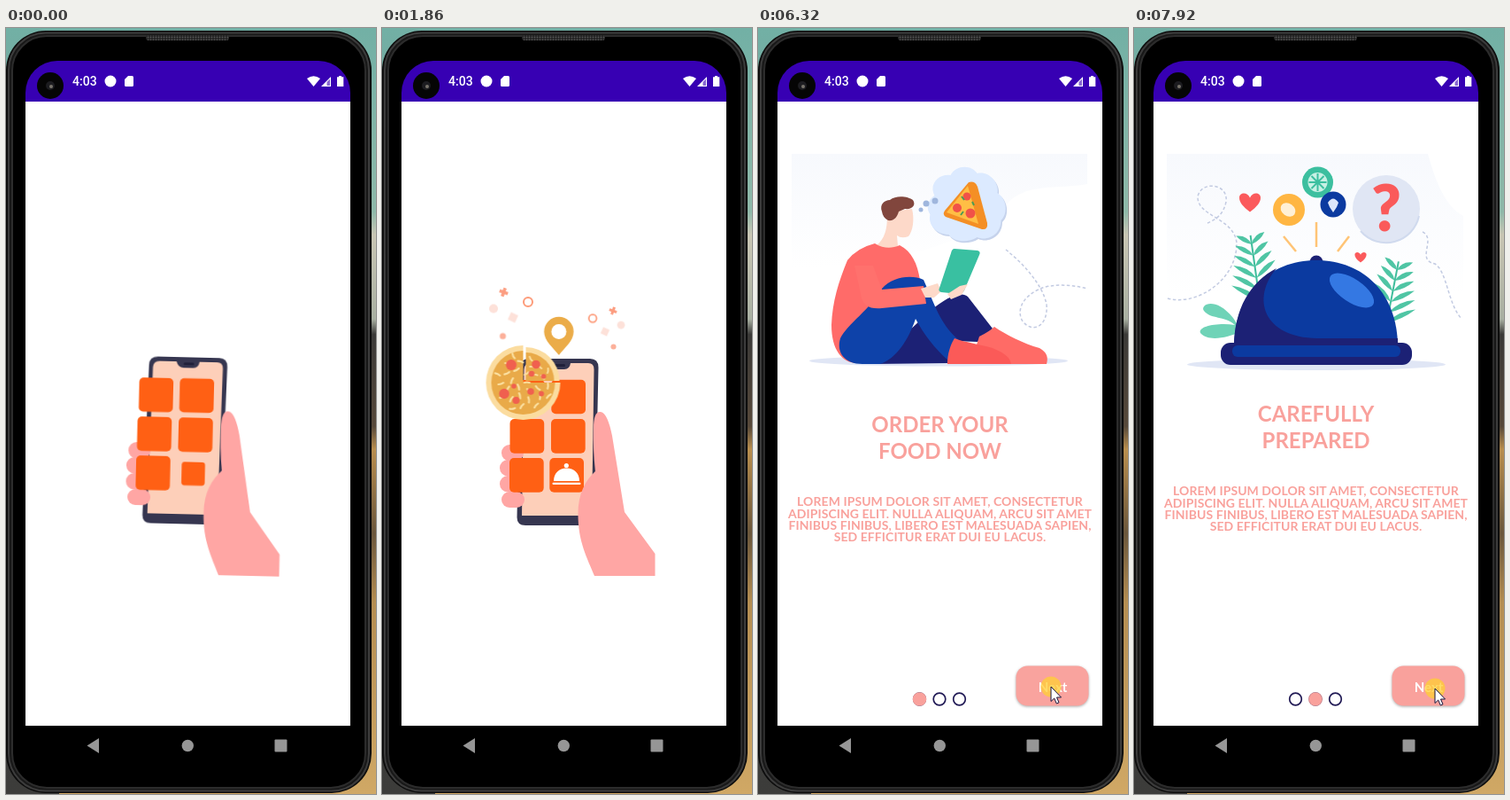
These frames come from a looping animation (418x864 px, 7990 ms). An HTML page:

```html
<!DOCTYPE html>
<html lang="en">
<head>
<meta charset="utf-8">
<title>Food ordering app</title>
<style>
html, body { margin: 0; width: 100%; height: 100%; overflow: hidden; background: #78b3a8; }
svg { position: absolute; display: block; }
.full { left: 0; top: 0; width: 418px; height: 864px; }
#screen { position: absolute; left: 22px; top: 83px; width: 367px; height: 703.5px; overflow: hidden; background: #fff; }
#screen .full { left: -22px; top: -83px; }
#intro { position: absolute; inset: 0; background: #fff; }
.page { position: absolute; left: 0; top: 37px; width: 367px; height: 600px; transform-origin: 0 0; }
.title, .para, .next { font-family: Lato, "Open Sans", sans-serif; font-weight: 700; text-anchor: middle; fill: #f9a19c; }
.title { font-size: 24px; }
.para { font-size: 14px; letter-spacing: .07px; }
.next { font-size: 15px; fill: #fff; }
.clock { font: 500 14px Roboto, sans-serif; fill: #fff; }
.ask { font: 900 72px Lato, sans-serif; text-anchor: middle; fill: #fa5a5a; }
.dash { fill: none; stroke: #c3cbe2; stroke-width: 1.5; stroke-dasharray: 3.5 2.5; }

.hand, .tile, .dish, .pizza, .pin, .bit, #intro, .page, .cursor, .cursor g, .click, .glow, .active {
  animation: 7990ms linear infinite;
}
.hand { transform-origin: 272px 620px; animation-name: settle; }
.tile { transform-origin: 209px 504px; animation-name: tile; }
.dish { transform-origin: 208.5px 504px; animation-name: dish; }
.pizza { animation-name: pizza; }
.pin { animation-name: pin; }
.bit { animation-name: burst; }
#intro { animation-name: enter; }
#first { animation-name: leave; }
#second { animation-name: arrive; }
.cursor { animation-name: show; animation-timing-function: step-end; }
.cursor g { animation-name: travel; }
.click { animation-name: click; animation-timing-function: step-end; }
.glow { animation-name: glow; }
.active { animation-name: active; animation-timing-function: step-end; }

@keyframes settle {
  0% { transform: rotate(1.35deg); animation-timing-function: ease-out; }
  6%, 100% { transform: none; }
}
@keyframes tile {
  0% { transform: scale(.68); animation-timing-function: ease-out; }
  3% { transform: scale(.96); }
  7.3% { transform: scale(.95); }
  10.8%, 100% { transform: scale(1); }
}
@keyframes dish {
  0%, 2.5% { transform: scale(0); animation-timing-function: ease-out; }
  7.3% { transform: scale(.92); }
  10.8%, 100% { transform: scale(1); }
}
@keyframes pizza {
  0%, 4.4% { transform: scale(0); }
  7.26% { transform: scale(.86); animation-timing-function: ease-out; }
  8.9% { transform: scale(1.09); animation-timing-function: ease-in-out; }
  11.2%, 100% { transform: scale(1); }
}
@keyframes pin {
  0%, 5.4% { transform: scale(0); }
  7.26% { transform: scale(.56); animation-timing-function: ease-out; }
  9.3% { transform: scale(1.09); animation-timing-function: ease-in-out; }
  11.6%, 100% { transform: scale(1); }
}
@keyframes burst {
  0%, 12% { transform: translate(var(--dx), var(--dy)) scale(0); opacity: 0; animation-timing-function: ease-out; }
  20.8% { transform: translate(0, 5px) scale(1); opacity: 1; }
  23.3% { transform: translate(0, 0) scale(1); opacity: 1; }
  30.9% { transform: translate(0, -8px) scale(1); opacity: .75; }
  39.5%, 100% { transform: translate(0, -8px) scale(.8); opacity: 0; }
}
@keyframes enter {
  0%, 41.9% { opacity: 0; transform: translateY(20px); animation-timing-function: ease-out; }
  45.6%, 100% { opacity: 1; transform: none; }
}
@keyframes leave {
  0%, 90.9% { transform: perspective(1200px) rotateY(0deg); }
  91.6% { transform: perspective(1200px) rotateY(5.8deg); animation-timing-function: ease-in-out; }
  96.8%, 100% { transform: perspective(1200px) rotateY(90deg); }
}
@keyframes arrive {
  0%, 90.9% { transform: translateX(367px) perspective(1200px) rotateY(-90deg); }
  91.6% { transform: translateX(363.5px) perspective(1200px) rotateY(-89.2deg); animation-timing-function: ease-in-out; }
  96.8%, 100% { transform: translateX(0) perspective(1200px) rotateY(0deg); }
}
@keyframes show {
  0% { opacity: 0; }
  30% { opacity: 1; }
  39.9% { opacity: 0; }
  50% { opacity: 1; }
}
@keyframes travel {
  0%, 30% { transform: translate(346px, 783px); }
  31.7% { transform: translate(256px, 702px); }
  35% { transform: translate(148px, 588px); animation-timing-function: ease-out; }
  39.2% { transform: translate(82px, 572px); animation-timing-function: step-end; }
  50% { transform: translate(88px, 559px); animation-timing-function: ease-in-out; }
  58.2%, 85% { transform: translate(331px, 743px); animation-timing-function: ease-in-out; }
  90.1%, 92.5% { transform: translate(99px, 585px); animation-timing-function: ease-in-out; }
  98.4%, 100% { transform: translate(340px, 745px); }
}
@keyframes click {
  0% { opacity: 0; }
  79% { opacity: .75; }
  81.5% { opacity: 0; }
  98.7% { opacity: .75; }
}
@keyframes glow {
  0%, 79% { opacity: 0; }
  80% { opacity: .18; }
  81.6%, 100% { opacity: 0; }
}
@keyframes active {
  0% { transform: none; }
  95.4%, 100% { transform: translateX(22.5px); }
}
</style>
</head>
<body>

<svg class="full" viewBox="0 0 418 864">
  <defs>
    <linearGradient id="wall" x2="0" y2="1">
      <stop offset="0" stop-color="#72b0a5"/><stop offset=".24" stop-color="#8fb9a9"/>
      <stop offset=".27" stop-color="#c9c6b4"/><stop offset=".38" stop-color="#a9b0a2"/>
      <stop offset=".4" stop-color="#3b3a38"/><stop offset=".52" stop-color="#57493a"/>
      <stop offset=".55" stop-color="#b98e4e"/><stop offset=".66" stop-color="#6b573c"/>
      <stop offset=".75" stop-color="#b58e52"/><stop offset="1" stop-color="#d0a865"/>
    </linearGradient>
    <linearGradient id="shade" x2="0" y2="1">
      <stop offset="0" stop-color="#72b0a5"/><stop offset=".3" stop-color="#7d9a90"/>
      <stop offset=".45" stop-color="#454543"/><stop offset="1" stop-color="#3c3c3a"/>
    </linearGradient>
    <pattern id="mesh" width="3" height="3" patternUnits="userSpaceOnUse">
      <rect width="3" height="3" fill="#222"/><circle cx="1.5" cy="1.5" r=".9" fill="#555"/>
    </pattern>
  </defs>
  <rect width="418" height="864" fill="url(#wall)"/>
  <rect width="60" height="864" fill="url(#shade)"/>
  <rect x="0" y="3" width="413" height="860" rx="45" fill="#0d0d0d"/>
  <rect x="3" y="5.500" width="407" height="855" rx="42" fill="#181818" stroke="#3c3c3c" stroke-width="2"/>
  <rect x="7" y="9" width="399" height="848" rx="39" stroke="#2c2c2c" stroke-width="2"/>
  <rect x="158" y="8" width="94" height="6" rx="3" fill="url(#mesh)"/>
  <path d="M22 84V73A36 36 0 0 1 58 37H353A36 36 0 0 1 389 73V84Z" fill="#3700b3"/>
  <circle cx="50" cy="65" r="15" fill="#050505"/>
  <circle cx="50" cy="65" r="5" fill="#1c1c20"/><circle cx="51" cy="66" r="2" fill="#77736b"/>
  <text class="clock" x="75" y="65">4:03</text>
  <g fill="#fff">
    <circle cx="118" cy="60" r="6.5"/>
    <path d="M138 54H142.500Q144 54 144 55.500V64.500Q144 66 142.500 66H135.500Q134 66 134 64.500V58Z"/>
    <path d="M340 57Q347.500 51.500 355 57L347.500 66Z"/>
    <path d="M356 66L367 55V66Z"/>
    <path d="M376 54H379V55.300H381.300V66H374V55.300H376Z"/>
  </g>
  <path d="M362.500 61V65H366V57.500Z" fill="#3700b3" opacity=".6"/>
  <g fill="#969696">
    <path d="M91.500 809.500L105 801V818Z"/><circle cx="205.300" cy="809.500" r="6.700"/>
    <rect x="303.500" y="802.500" width="14" height="14" rx="1"/>
  </g>
</svg>

<div id="screen">
  <svg class="full" viewBox="0 0 418 864">
    <g class="hand">
      <path d="M166 373H235Q244.500 373 244.500 383L242 500L238 561H162Q152.500 561 152.500 552L156 383Q156 373 166 373Z" fill="#363650"/>
      <path d="M168 378H187Q189 385 195 385H206Q212 385 213 378H233Q239.500 378 239.500 385L237 550H158L160.500 385Q161 378 168 378Z" fill="#fdcfb9"/>
      <rect x="195" y="379" width="12" height="3" rx="1.500" fill="#20203a"/>
      <g fill="#ffa6a4">
        <rect x="135" y="470" width="25" height="18.500" rx="9"/>
        <rect x="133" y="487" width="26" height="18.500" rx="9"/>
        <rect x="133" y="505" width="26" height="18.500" rx="9"/>
        <rect x="135" y="523" width="26" height="18" rx="9"/>
      </g>
      <g fill="#ff6014">
        <rect x="145.500" y="397" width="38.500" height="38.500" rx="5"/>
        <rect x="191.300" y="396.800" width="38.700" height="38.500" rx="5"/>
        <rect x="144.500" y="441" width="38.700" height="38.700" rx="5"/>
        <rect x="191" y="441" width="38.700" height="38.700" rx="5"/>
        <rect x="144" y="485" width="38.700" height="38.700" rx="5"/>
        <rect class="tile" x="189.300" y="485" width="38.700" height="38.700" rx="5"/>
      </g>
      <g class="dish" fill="#fff">
        <circle cx="208.300" cy="493.500" r="2.600"/>
        <path d="M194 511C194 502 200 496.500 208.500 496.500S223 502 223 511Z"/>
        <rect x="192.500" y="512.700" width="32" height="2.200" rx="1"/>
      </g>
      <path d="M239 452C239 438 242 432 247 433C253 434 257 445 260 460L274 546L308.500 593V618H240C232 598 221.500 580 221.500 548C221.500 525 230 510 241 500C239 482 238.500 466 239 452Z" fill="#ffa6a4"/>
    </g>
    <g transform="translate(159.500 400)"><g class="pizza" id="pizza"></g></g>
    <g transform="translate(199.800 369)"><g class="pin">
      <path d="M0 0C-6-8-16.700-16-16.700-26.500A16.700 16.700 0 0 1 16.700-26.500C16.700-16 6-8 0 0Z" fill="#ebac48"/>
      <circle cy="-26.500" r="8.500" fill="#fff"/>
    </g></g>
    <g id="confetti"></g>
  </svg>

  <div id="intro">
    <div class="page" id="first">
      <svg width="367" height="600" viewBox="22 120 367 600">
        <defs><linearGradient id="haze" x2="0" y2="1">
          <stop offset="0" stop-color="#f7f9fd"/><stop offset="1" stop-color="#fff"/>
        </linearGradient></defs>
        <path d="M38 142H372V176C340 182 300 174 280 200C240 250 120 270 38 270Z" fill="url(#haze)"/>
        <ellipse cx="204" cy="375.500" rx="146" ry="6" fill="#e0e6f5"/>
        <path class="dash" d="M280 250C300 266 322 290 326 312C328 336 311 345 299 331C290 316 303 298 325 292C343 288 360 291 372 294"/>
        <path d="M130 379L196 318C212 304 230 296 237 303L265 339L248 354L222 353L214 378Z" fill="#1c2175"/>
        <path d="M250 348Q262 342 267 337C280 346 300 356 318 361C327 366 328 372 326 379H240Z" fill="#ff6b66"/>
        <path d="M152 207L174 204C177 216 175 229 170 235Q162 238 157 234L158 246Q145 256 134 245C143 238 146 227 146 212Z" fill="#fdd9c9"/>
        <path d="M140 207C137 199 143 194 149 194C156 188 170 190 175 194C179 200 174 205 166 204L159 207C157 214 153 218 147 217Q141 214 140 207Z" fill="#81463d"/>
        <path d="M132 243C142 249 151 249 160 245C174 252 180 266 183 284L150 330L112 378C95 378 83 363 83 335C84 309 91 286 101 262Q112 248 132 243Z" fill="#ff6b69"/>
        <path d="M140 294C152 280 174 278 187 284L200 314C208 332 217 344 226 351L215 375C200 362 187 345 178 328C170 352 156 373 138 379H118C98 379 88 366 93 350C100 335 128 316 140 294Z" fill="#0e42a9"/>
        <path d="M222 350C235 355 248 356 265 361C277 366 285 371 286 379H214C214 368 217 358 222 350Z" fill="#fb5a58"/>
        <path d="M109 268L116 300C118 314 126 317 140 316L190 311L187 291L140 295L130 268Z" fill="#ff716d"/>
        <path d="M184 294L203 288L207 297L199 304L189 304Z" fill="#fdd9c9"/>
        <path d="M222 249L248 251Q252 252 250 256L233 296Q231 300 227 300L207 298Q203 297 205 293L218 254Q219 249 222 249Z" fill="#39c0a1"/>
        <path d="M214 300L228 291L237 289L230 301L218 306Z" fill="#fdd9c9"/>
        <path id="cloud" d="M201 191C194 178 206 166 219 168C226 155 244 157 249 166C264 163 274 178 272 188C283 195 284 212 276 219C276 235 261 243 249 238C238 245 222 243 217 235C203 235 193 224 196 212C191 206 193 196 201 191Z" fill="#c6d3ec"/>
        <use href="#cloud" style="filter:brightness(1.11)" transform="translate(-1.500 -2)"/>
        <g fill="#9fb6dd"><circle cx="200" cy="195" r="3.500"/><circle cx="190" cy="198" r="3.500"/><circle cx="184" cy="205" r="2.500"/></g>
        <path d="M238 174Q245 172 248 179L259 220Q260 228 253 227L212 213Q208 210 211 206Z" fill="#f48f25"/>
        <path d="M237 178L249 221L213 208Z" fill="#ffbe45"/>
        <g fill="#f15248"><circle cx="236" cy="190" r="4.500"/><circle cx="225" cy="203" r="5"/><circle cx="240" cy="209" r="5.500"/></g>
        <path d="M230 190l3 4M232 207l-3 4M242 196l2 4" stroke="#4a9c55" stroke-width="2"/>
        <text class="title" x="205.500" y="456">ORDER YOUR</text>
        <text class="title" x="205.500" y="486">FOOD NOW</text>
        <g id="lorem" class="para">
          <text x="205.500" y="539">LOREM IPSUM DOLOR SIT AMET, CONSECTETUR</text>
          <text x="205.500" y="552.500">ADIPISCING ELIT. NULLA ALIQUAM, ARCU SIT AMET</text>
          <text x="205.500" y="566">FINIBUS FINIBUS, LIBERO EST MALESUADA SAPIEN,</text>
          <text x="205.500" y="579">SED EFFICITUR ERAT DUI EU LACUS.</text>
        </g>
      </svg>
    </div>

    <div class="page" id="second">
      <svg width="367" height="600" viewBox="22 120 367 600">
        <path d="M37 142H332C340 170 350 200 372 212V300H37Z" fill="url(#haze)"/>
        <ellipse cx="206" cy="379.500" rx="146" ry="6.500" fill="#e0e6f5"/>
        <path class="dash" d="M38 305C70 314 116 285 116 243C114 214 71 213 72 190C76 172 107 175 104 196C101 211 92 216 83 220M326 230C342 238 318 262 340 266C354 275 354 310 370 328"/>
        <g id="plants" fill="#4fc5a4" stroke="#3fbd9c"></g>
        <path d="M112 327C92 302 74 312 79 319C87 329 102 324 114 335C96 332 72 336 75 344C84 354 104 350 122 342Z" fill="#6fd3b7"/>
        <path d="M206 219V247M169 235L183 252M243 235L230 252" stroke="#ffc476" stroke-width="2.500"/>
        <circle cx="206" cy="264" r="7.500" fill="#1c2175"/>
        <path d="M113 360C113 300 152 262 206 262S298 300 298 360Z" fill="#0b3aa0"/>
        <path d="M113 360C113 316 132 286 161 271C132 305 146 349 207 350H298V360Z" fill="#1c2175"/>
        <ellipse cx="246" cy="296" rx="29" ry="13" transform="rotate(34 246 296)" fill="#3478e3"/>
        <rect x="98" y="355" width="216" height="25" rx="11" fill="#1c2175"/>
        <rect x="111" y="358" width="190" height="13" rx="6" fill="#0b3aa0"/>
        <circle cx="175" cy="205" r="18" fill="#ffb642"/>
        <ellipse cx="174" cy="205" rx="9" ry="7" transform="rotate(35 174 205)" fill="#fff0d6"/>
        <circle cx="207.500" cy="174" r="17.500" fill="#3cbf9f"/>
        <circle cx="207.500" cy="174" r="11" fill="#c9f1e5"/>
        <path d="M207.500 164V184M197.500 174H217.500M200.500 167L214.500 181M214.500 167L200.500 181" stroke="#3cbf9f" stroke-width="2"/>
        <circle cx="225" cy="199" r="14.500" fill="#0b3aa0"/>
        <path d="M219 197Q225 188 231 197L229 202L225 208L221 202Z" fill="#dce6fa"/>
        <circle cx="285" cy="204" r="38" fill="#e0e6f4"/>
        <path d="M256 229A38 38 0 0 0 322 212" fill="none" stroke="#d0daee" stroke-width="2"/>
        <text class="ask" x="285" y="229">?</text>
        <g id="hearts" fill="#fb5a5c"></g>
        <text class="title" x="205.500" y="443.500">CAREFULLY</text>
        <text class="title" x="205.500" y="473.500">PREPARED</text>
        <use href="#lorem" y="-12"/>
      </svg>
    </div>

    <svg class="full" viewBox="0 0 418 864">
      <g fill="#fff" stroke="#211a55" stroke-width="1.700">
        <circle cx="182.500" cy="757" r="6.800"/><circle cx="205" cy="757" r="6.800"/><circle cx="227.500" cy="757" r="6.800"/>
      </g>
      <circle class="active" cx="182.500" cy="757" r="7.800" fill="#f9a19c"/>
      <rect x="291.500" y="719.500" width="82" height="45" rx="13" fill="#f9a19c" style="filter:drop-shadow(0 1.500px 1.500px #0005)"/>
      <rect class="glow" x="291.500" y="719.500" width="82" height="45" rx="13" fill="#fff"/>
      <text class="next" x="333" y="748.500">Next</text>
    </svg>
  </div>
</div>

<svg class="full cursor" viewBox="0 0 418 864"><g>
  <circle class="click" r="11.500" fill="#ffcf33"/>
  <path d="M0 0V16.500L3.700 13L6.300 19L9 17.800L6.500 12H11.500Z" fill="#fff" stroke="#16123a"/>
</g></svg>

<script>
const fill = (id, html) => { document.getElementById(id).innerHTML = html; };
const dots = list => list.map(([x, y, r]) => `<circle cx="${x}" cy="${y}" r="${r}" fill="#f0604f"/>`).join('');

// Cheese sticks spread by the golden angle, sorted into the loose slice or the rest
const sticks = { pie: '', slice: '' };
for (let i = 0; i < 30; i++) {
  const r = 33 * Math.sqrt((i + .5) / 30), a = i * 2.4;
  const x = r * Math.cos(a), y = r * Math.sin(a);
  const part = x > 0 && y < 0 ? 'slice' : 'pie';
  sticks[part] += `<path d="M-3 0Q0-1 3 0" transform="translate(${x} ${y}) rotate(${i * 73})"/>`;
}
const cheese = html => `<g fill="none" stroke="#fbe0a0" stroke-width="2.200" stroke-linecap="round">${html}</g>`;
fill('pizza', `
  <path d="M0 0V-42A42 42 0 1 0 42 0Z" fill="#fbdc9f"/>
  <path d="M0 0V-36A36 36 0 1 0 36 0Z" fill="#e9aa49"/>
  ${cheese(sticks.pie)}
  ${dots([[-13.5, -20, 6], [-21.5, 12.5, 5.7], [-10.5, 4, 2.8], [-8, 20, 4], [8.5, 10, 3.8], [20.5, 12.5, 3]])}
  <g transform="translate(3 -2)">
    <path d="M0 0V-38A38 38 0 0 1 38 0Z" fill="#fbdc9f"/>
    <path d="M0 0V-32A32 32 0 0 1 32 0Z" fill="#e9aa49"/>
    ${cheese(`<g transform="scale(.88)">${sticks.slice}</g>`)}
    ${dots([[11.5, -18.5, 4.8], [6.5, -8, 3.3], [20, -5, 2.8]])}
  </g>`);

const shapes = {
  plus: '<path d="M-5 0H5M0-5V5" transform="rotate(20)" stroke="#fc9d80" stroke-width="3.500"/>',
  ring: '<circle r="5" fill="none" stroke="#fd9a78" stroke-width="2"/>',
  ball: '<circle r="5" fill="#fde1d9"/>',
  box: '<rect x="-4.500" y="-4.500" width="9" height="9" transform="rotate(25)" fill="#fde1d9"/>',
  dot: '<circle r="3.500" fill="#fcb09a"/>'
};
const burst = (ox, oy, size, bits) => bits.map(([kind, x, y]) =>
  `<g transform="translate(${x} ${y})"><g class="bit" style="--dx:${ox - x}px;--dy:${oy - y}px">
   <g transform="scale(${size})">${shapes[kind]}</g></g></g>`).join('');
fill('confetti',
  burst(152, 370, 1, [['plus', 137.5, 298], ['ring', 165, 309], ['ball', 126, 316.5], ['box', 148, 326.5], ['dot', 136.5, 347.5]]) +
  burst(247, 375, .87, [['plus', 261, 319], ['ring', 238, 327.5], ['ball', 270, 335], ['box', 252, 342.5], ['dot', 261.5, 359.5]]));

// Fern: paired leaves, shorter towards the tip
const frond = (x, y, turn, len) => {
  let out = `<path d="M0 0V${-len}" stroke-width="2"/>`;
  for (let i = 0; i < 6; i++) {
    const h = -len * (i + .6) / 6.4, w = 18 - i * 1.6;
    for (const side of [-1, 1])
      out += `<path d="M0 0Q${w}-7 ${2 * w} 0Q${w} 4 0 0Z" stroke="none" transform="translate(0 ${h}) scale(${side} 1) rotate(-36)"/>`;
  }
  return `<g transform="translate(${x} ${y}) rotate(${turn})">${out}</g>`;
};
fill('plants', frond(143, 315, -8, 82) + frond(284, 340, 11, 78));

const heart = (x, y, s) =>
  `<path transform="translate(${x} ${y}) scale(${s})" d="M0 10C-8 4-12-1-12-6C-12-12-3-13 0-6C3-13 12-12 12-6C12-1 8 4 0 10Z"/>`;
fill('hearts', heart(131, 197.5, 1) + heart(256, 259, .55));
</script>
</body>
</html>
```
